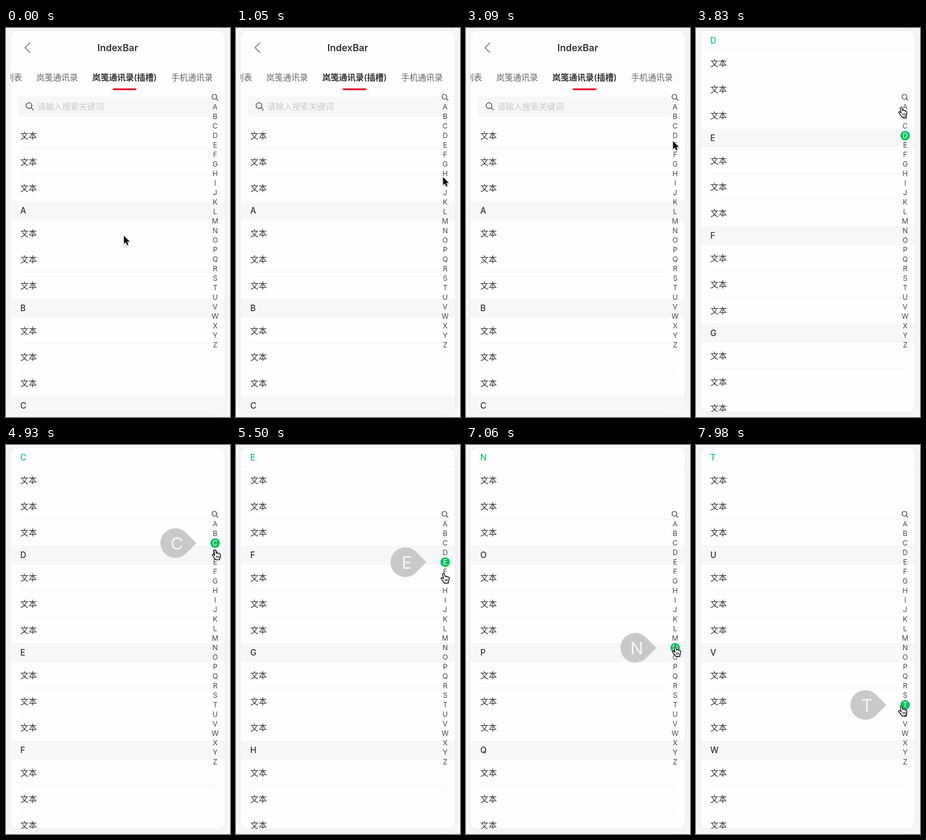
An HTML page with a canvas that plays this animation: 377 px wide and 654 px high, repeating every 8000 ms.

```html
<!DOCTYPE html>
<html lang="zh">
<head>
<meta charset="utf-8">
<title>IndexBar</title>
<style>
  html, body { margin: 0; width: 100%; height: 100%; overflow: hidden; background: #f6f7f9; }
  canvas { display: block; width: 100%; height: 100%; }
</style>
</head>
<body>
<canvas id="stage"></canvas>
<script>
const W = 377, H = 654, LOOP = 8000;
const canvas = document.getElementById('stage');
const ctx = canvas.getContext('2d');
const ratio = window.devicePixelRatio || 1;
canvas.width = W * ratio;
canvas.height = H * ratio;

const FONT = 'Inter, "Noto Sans CJK SC", "Noto Sans CJK", sans-serif';
const LETTERS = [...'ABCDEFGHIJKLMNOPQRSTUVWXYZ'];
const INK = '#323233', GREY = '#646566', SOFT = '#f6f7f9', GREEN = '#07c160', CARD = '#fefefe';
const CARD_TOP = 5, BAND = 32, ROW = 44, SECTION = BAND + 3 * ROW;

// The tap on D, then the drag down the index.
const TAP = 3150, TAP_END = 3400, DRAG = 4120, DRAG_END = 7980;

const ramp = (t, a, b) => Math.min(1, Math.max(0, (t - a) / (b - a)));
const ease = (t, a, b) => Math.sin(ramp(t, a, b) * Math.PI / 2);
const dragged = t => ramp(t, DRAG, DRAG_END) ** 1.4;
const indexY = i => 133 + 16 * i;

function arrowAt(t) {
  const go = ease(t, 120, 880);
  return [
    198 + 150 * go,
    349 - 76 * go + 76 * Math.sin(Math.PI * go)
      - 69 * ease(t, 940, 1460) + 34 * ease(t, 1630, 1930)
      - 25 * ease(t, 2170, 2630) - 29 * ramp(t, 2860, TAP)
  ];
}

function handAt(t) {
  const p = dragged(t), u = ramp(t, DRAG, DRAG_END);
  return [
    340.3 + 6.5 * Math.sin(2 * Math.PI * u) ** 2,
    184 - 57 * ramp(t, TAP, 3660) + 11 * ramp(t, 3720, 3950)
      + 300 * p + 5.5 * Math.sin(2 * Math.PI * p)
  ];
}

function activeAt(t) {
  if (t < TAP) return -1;
  return t < DRAG ? 3 : Math.floor(19.8 * dragged(t));
}

// y is the optical middle of the line
function text(str, x, y, size, color, weight = 400, align = 'left') {
  ctx.font = `${weight} ${size}px ${FONT}`;
  ctx.textAlign = align;
  ctx.fillStyle = color;
  ctx.fillText(str, x, Math.round(y + size * 0.365));
}

function rect(x, y, w, h, color) {
  ctx.fillStyle = color;
  ctx.fillRect(x, y, w, h);
}

function round(x, y, w, h, r, color) {
  ctx.beginPath();
  ctx.roundRect(x, y, w, h, r);
  ctx.fillStyle = color;
  ctx.fill();
}

function stroke(color, width, path) {
  ctx.strokeStyle = color;
  ctx.lineWidth = width;
  if (path) ctx.stroke(path);
  else ctx.stroke();
}

function lens(x, y, r, tail, color, width) {
  const d = r * Math.SQRT1_2;
  ctx.beginPath();
  ctx.arc(x, y, r, Math.PI / 4, Math.PI * 2.25);
  ctx.lineTo(x + d + tail, y + d + tail);
  stroke(color, width);
}

function rows(y) {
  for (let i = 0; i < 3; i++) {
    text('文本', 24, y + i * ROW + 22, 14, INK);
    if (i < 2) rect(24, y + (i + 1) * ROW - 1, 328, 1, '#f2f3f5');
  }
}

function header() {
  ctx.beginPath();
  ctx.moveTo(40.5, 24.5);
  ctx.lineTo(32, 33);
  ctx.lineTo(40.5, 41.5);
  stroke('#969799', 2);
  text('IndexBar', 188, 33, 16, INK, 600, 'center');

  text('列表', 27, 83, 14, GREY, 400, 'right');
  text('岚笺通讯录', 51, 83, 14, GREY);
  text('岚笺通讯录(插槽)', 199.5, 83, 14, INK, 600, 'center');
  text('手机通讯录', 278, 83, 14, GREY);
  round(179.5, 101.5, 40, 3, 1.5, '#ea0d20');

  round(20, 115, 336, 34, 4, SOFT);
  lens(38.7, 130.5, 4.9, 4.3, INK, 1.1);
  text('请输入搜索关键词', 52.5, 132, 14, '#c8c9cc');
}

function list(active) {
  const scrolled = active >= 0;
  const top = scrolled ? CARD_TOP - SECTION * active : 291;
  if (!scrolled) {
    header();
    rows(top - 3 * ROW);
  }
  LETTERS.forEach((ch, i) => {
    const y = top + i * SECTION, on = i === active;
    if (y < 0 || y > H) return;
    rect(8, y, 360, BAND, on ? CARD : SOFT);
    if (on) rect(8, y + BAND - 1, 360, 1, '#f0f1f3');
    text(ch, 24, y + BAND / 2, 14, on ? GREEN : INK, 500);
    rows(y + BAND);
  });
}

function indexBar(active) {
  lens(350.8, 115.6, 4, 3.5, '#555', 1.4);
  LETTERS.forEach((ch, i) => {
    const y = indexY(i), on = i === active;
    if (on) round(344, y - 8, 16, 16, 8, GREEN);
    text(ch, 352, y, 12, on ? '#fff' : '#48494b', 400, 'center');
  });
}

function bubble(active) {
  const x = 285, y = indexY(active), r = 25;
  ctx.beginPath();
  ctx.arc(x, y, r, Math.PI / 4, Math.PI * 1.75);
  ctx.lineTo(x + r * Math.SQRT2, y);
  ctx.fillStyle = '#c9c9c9';
  ctx.fill();
  text(LETTERS[active], x + 2.5, y, 29, '#f6f6f6', 400, 'center');
}

const ARROW = new Path2D('M0 0V13.6L3.1 10.7L5.1 15.6L7.4 14.6L5.4 9.9H9.7Z');
const HAND = new Path2D(
  'M5 10.5L3.6 2.6C3.3 .4 6 0 6.4 2L7.4 6.6C7.8 5.4 9.6 5.4 10 7' +
  'C10.6 6 12.2 6.3 12.4 7.8C13.2 7.1 14.5 7.6 14.5 9.2' +
  'C14.6 12 14 13.4 13.2 15V17.4H6.2C5.8 15.5 3.4 13.6 1.2 10.6' +
  'C.1 9 1.8 7.6 3.2 8.9Z');
const KNUCKLES = new Path2D('M7.7 11V14.4M9.7 11V14.4M11.6 11V14.4');

function cursor(t) {
  const arrow = t < TAP;
  ctx.save();
  ctx.translate(...(arrow ? arrowAt(t) : handAt(t)));
  ctx.shadowColor = 'rgba(0,0,0,.3)';
  ctx.shadowBlur = 2 * ratio;
  ctx.shadowOffsetY = ratio;
  ctx.lineJoin = 'round';
  if (arrow) {
    ctx.translate(0.5, 0.3);
    stroke('#fff', 2, ARROW);
    ctx.shadowColor = 'transparent';
    ctx.fillStyle = '#000';
    ctx.fill(ARROW);
  } else {
    ctx.fillStyle = '#fff';
    ctx.fill(HAND);
    ctx.shadowColor = 'transparent';
    stroke('#000', 1.2, HAND);
    stroke('#000', 0.9, KNUCKLES);
  }
  ctx.restore();
}

function draw(t) {
  const active = activeAt(t);
  ctx.setTransform(ratio, 0, 0, ratio, 0, 0);
  rect(0, 0, W, H, SOFT);

  ctx.save();
  ctx.shadowColor = 'rgba(100,105,115,.08)';
  ctx.shadowBlur = 12 * ratio;
  round(8, CARD_TOP, 360, 640, 12, CARD);
  ctx.shadowColor = 'transparent';
  ctx.clip();
  list(active);
  indexBar(active);
  if ((t >= TAP && t < TAP_END) || t >= DRAG) bubble(active);
  ctx.restore();

  cursor(t);
}

const start = performance.now();
function frame() {
  draw((performance.now() - start) % LOOP);
  requestAnimationFrame(frame);
}
frame();
</script>
</body>
</html>
```
